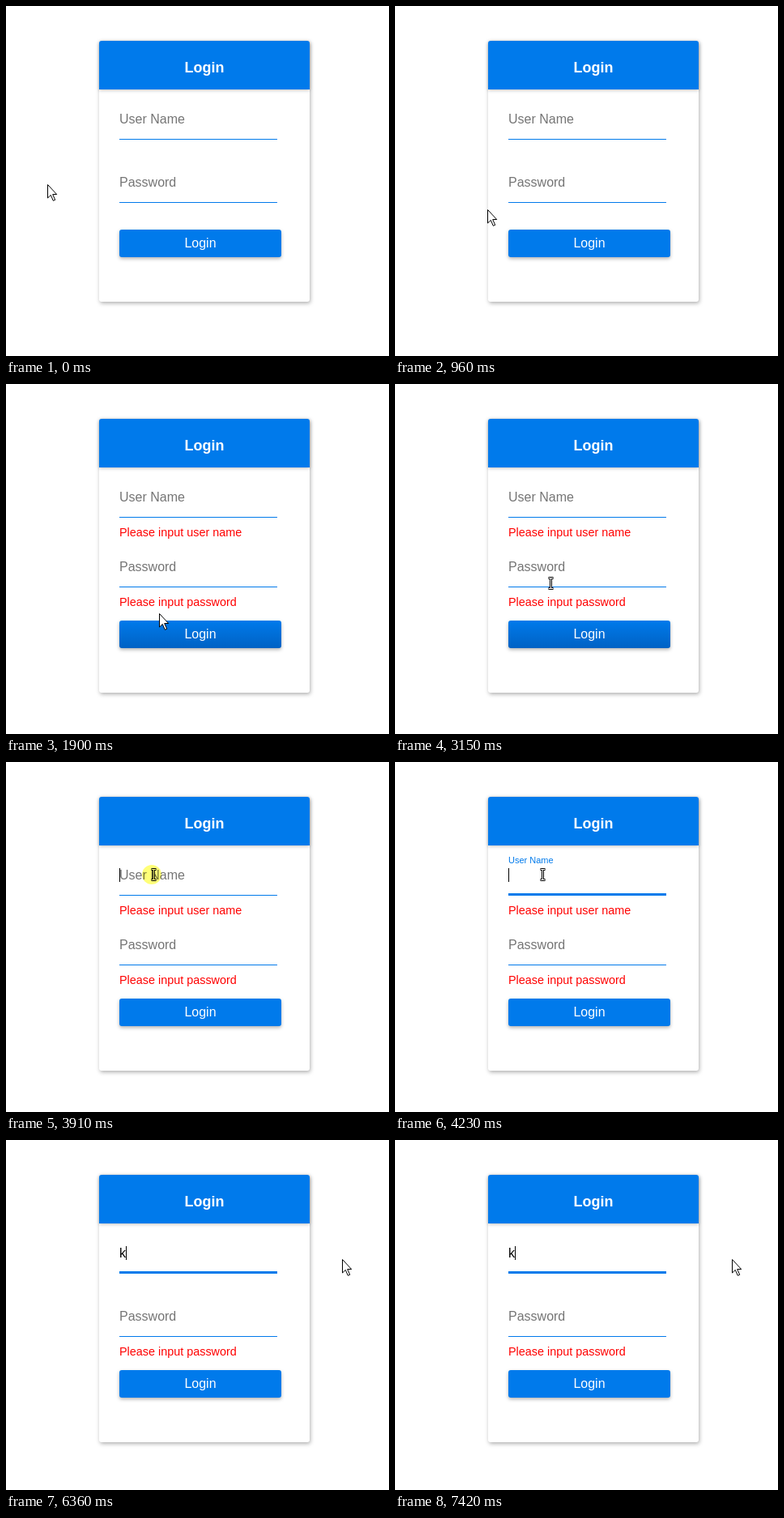
An HTML page that plays this animation: 473x432 px, repeating every 7600 ms.

```html
<!DOCTYPE html>
<html lang="en">
<head>
<meta charset="utf-8">
<title>Login form</title>
<style>
  html, body { margin: 0; width: 100%; height: 100%; overflow: hidden; background: #fff; }
  svg { display: block; font: 16px "Liberation Sans", Arial, sans-serif; }
  .blue { fill: #007aeb; }
  .hint { fill: #757575; }
  .error { fill: #f00; font-size: 14.4px; }
  .light { fill: #fff; text-anchor: middle; }
  .title { font-size: 18px; font-weight: bold; }
  .card { fill: #fff; filter: drop-shadow(1px 2px 2.5px rgba(0, 0, 0, .31)); }
  .head { filter: drop-shadow(0 1px 2px rgba(0, 0, 0, .25)); }
  .raised { filter: drop-shadow(0 2px 2px rgba(0, 0, 0, .3)); }
  #press { fill: #ffff78; mix-blend-mode: multiply; }
  .pointer { fill: #fff; stroke: #000; }
</style>
</head>
<body>
<svg width="473" height="432" viewBox="0 0 473 432">
  <defs>
    <linearGradient id="active" x2="0" y2="1">
      <stop stop-color="#007aeb"/>
      <stop offset="1" stop-color="#0062c4"/>
    </linearGradient>
  </defs>

  <rect id="card" class="card" x="115" y="43" width="260" height="322" rx="3"/>
  <path class="blue head" d="M115 103V46a3 3 0 0 1 3-3h254a3 3 0 0 1 3 3v57z"/>
  <text class="light title" x="245" y="82">Login</text>

  <rect class="blue" x="140" y="164" width="195" height="1"/>
  <rect id="bar" class="blue" y="162" height="3"/>
  <text id="label" x="140">User Name</text>
  <text id="typed" x="140" y="145">k</text>
  <rect id="caret" y="131" width="1" height="17"/>
  <text id="userError" class="error" x="140" y="188">Please input user name</text>

  <g id="password">
    <text class="hint" x="140" y="223">Password</text>
    <rect class="blue" x="140" y="242" width="195" height="1"/>
    <text id="passError" class="error" x="140" y="266">Please input password</text>
  </g>

  <g id="submit">
    <rect id="button" class="raised" x="140" y="276" width="200" height="34" rx="3"/>
    <text class="light" x="240" y="298">Login</text>
  </g>

  <g id="cursor">
    <path id="arrow" class="pointer" d="M.5.5V17l3.8-3.6 3 6.9 2.4-1-3-6.8h5z"/>
    <g id="hand" class="pointer" transform="translate(-5 -1)">
      <path d="M5.5 13V2a1.5 1.5 0 0 1 3 0V7c0-1.6 3-1.6 3 .5 0-1.5 2.5-1.5 2.5.5 0-1.5 2.5-1 2.5 1V14l-2 4v3.5H7v-3L1 11.5c-1-2 1-3 2.5-1.5z"/>
      <path d="M8.5 7v4M11.5 7.5v4M14 8v3.5"/>
    </g>
    <g id="beam" fill="none">
      <path d="M-2.5-6.5h6M-2.5 6.5h6M.5-6.5v13" stroke="#000" stroke-width="3"/>
      <path d="M-2-6.5h5M-2 6.5h5M.5-6.5v13" stroke="#fff"/>
    </g>
    <circle id="press" cx="-2" r="12"/>
  </g>
</svg>
<script>
const LOOP = 7600;
const START = [51, 220];
// first step, last step, step count, control point, end point, eased
const MOVES = [
  [450, 1150, 10, [96, 240], [142, 266], false],
  [1220, 1400, 4, [165, 275], [189, 283], false],
  [2960, 3410, 8, [197, 230], [182, 139], true],
  [4410, 5000, 9, [290, 124], [414, 147], true],
  [6360, 6420, 2, [415, 147], [416, 147], false]
];
const CARET_ON = [[3910, 4410], [4910, 5860], [6360, 6920], [7420, LOOP]];
const GREY = [117, 117, 117], BLUE = [0, 122, 235];

const $ = id => document.getElementById(id);
const set = (id, attrs) => {
  for (const name in attrs) $(id).setAttribute(name, attrs[name]);
};
const show = (id, on) => set(id, { visibility: on ? "visible" : "hidden" });
const within = (t, from, to) => t >= from && t < to;
const mix = (a, b, p) => a + (b - a) * p;

function pointerAt(t) {
  let from = START;
  for (const [first, last, count, bend, to, eased] of MOVES) {
    if (t < first) break;
    const gap = (last - first) / (count - 1);
    let p = Math.min(1, (Math.floor((t - first) / gap + 0.001) + 1) / count);
    if (eased) p *= p * (3 - 2 * p);
    from = from.map((a, i) => Math.round(mix(mix(a, bend[i], p), mix(bend[i], to[i], p), p)));
    if (p < 1) break;
  }
  return from;
}

function pointerKind(t, x, y) {
  if (t < 1900) return x >= 140 && y >= 276 ? "hand" : "arrow";
  const bands = [[122, 165], [176, 193], [207, 251], [261, 278]];
  return x < 336 && bands.some(([top, end]) => within(y, top, end)) ? "beam" : "arrow";
}

function draw(t) {
  const typed = t >= 5300;
  const userError = within(t, 1830, 5300), passError = t >= 1830;
  const passShift = userError ? 8 : 0;
  const shift = passShift + (passError ? 8 : 0);

  set("card", { height: 322 + shift });
  set("password", { transform: `translate(0 ${passShift})` });
  set("submit", { transform: `translate(0 ${shift})` });
  set("button", { fill: within(t, 1280, 3910) ? "url(#active)" : "#007aeb" });
  show("userError", userError);
  show("passError", passError);

  // Focus floats the label and spreads the underline from its middle.
  const step = Math.min(1, Math.max(0, Math.floor((t - 3910) / 64 + 0.001) / 5));
  const p = 1 - (1 - step) ** 2;
  set("label", {
    y: mix(145, 125, p),
    "font-size": mix(16, 11, p),
    fill: `rgb(${GREY.map((c, i) => Math.round(mix(c, BLUE[i], p)))})`
  });
  set("bar", { x: 237.5 - 97.5 * p, width: 195 * p });
  show("label", !typed);
  show("typed", typed);
  set("caret", { x: typed ? 148 : 140 });
  show("caret", CARET_ON.some(([from, to]) => within(t, from, to)));

  const [x, y] = pointerAt(t);
  const kind = pointerKind(t, x, y);
  set("cursor", { transform: `translate(${x} ${y})` });
  for (const id of ["arrow", "hand", "beam"]) show(id, id === kind);
  show("press", within(t, 1770, 1900) || within(t, 3910, 4035));
}

const begin = performance.now();
function tick() {
  draw((performance.now() - begin) % LOOP);
  requestAnimationFrame(tick);
}
tick();
</script>
</body>
</html>
```
